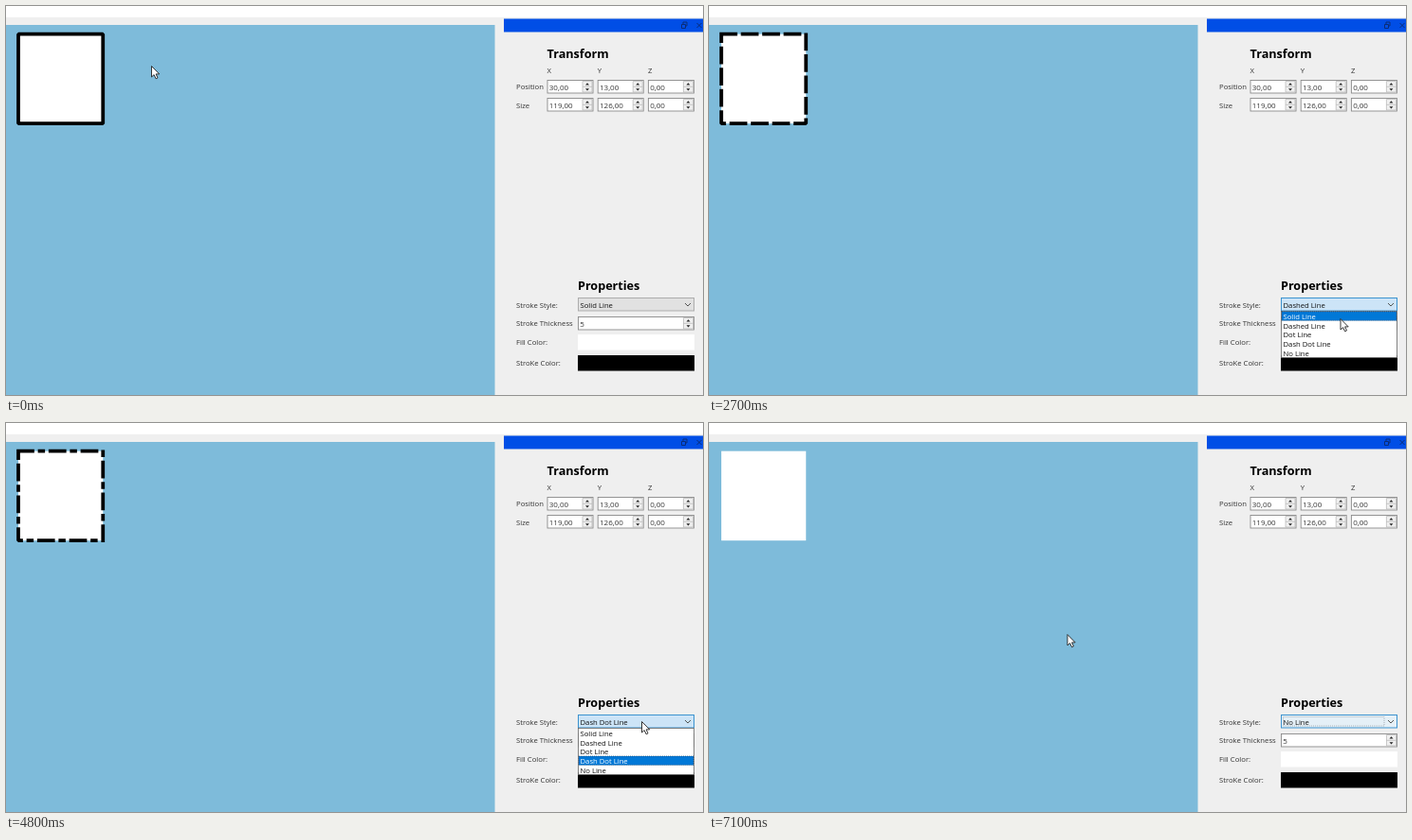
Recreate the animation shown at these times as an HTML page. Size 735 by 411 pixels, loop 7200 ms.

```html
<!DOCTYPE html>
<html lang="en">
<head>
<meta charset="utf-8">
<title>Stroke style panel</title>
<style>
  html, body { margin: 0; width: 100%; height: 100%; overflow: hidden; background: #efefef; }
  svg { display: block; width: 735px; height: 411px; }
  text { font: 7.7px "Open Sans", "Noto Sans", sans-serif; fill: #333; white-space: pre; }
  .heading { font-size: 12.6px; font-weight: 700; fill: #000; }
  .number { font-size: 8px; }
  .item { fill: #111; }
</style>
</head>
<body>
<svg id="stage" viewBox="0 0 735 411">
  <rect width="735" height="411" fill="#efefef"/>
  <rect width="735" height="12" fill="#fff"/>
  <rect y="20" width="515.5" height="391" fill="#7ebbda"/>
  <rect x="525" y="13.5" width="210" height="14" fill="#004ee6"/>
  <path d="M712.5 19.5h4v4h-4zM714 19v-2h4v4h-1.5M728.5 18l5 5m0-5l-5 5" fill="none" stroke="#0a2c78"/>
  <rect id="shape" x="13" y="29.7" width="89.25" height="94.5" fill="#fff" stroke="#000" stroke-width="3.75"/>
  <g id="panel"></g>
  <rect x="603" y="347" width="123" height="16.5" fill="#fff"/>
  <rect x="603" y="369" width="123" height="16.5"/>
  <g id="combo">
    <rect id="comboBox" x="603.5" y="308.5" width="122" height="13.5"/>
    <path id="focus" d="M605.5 310.5h106.5v9.5h-106.5z" fill="none" stroke="#8a949c" stroke-width=".7" stroke-dasharray="1 1"/>
    <path d="M716 314l3 3 3-3" fill="none" stroke="#444" stroke-width=".9"/>
    <text id="comboText" class="item" x="605.5" y="318.5"></text>
  </g>
  <g id="popup">
    <rect x="603.5" y="322.5" width="122" height="49" fill="#fff" stroke="#666" stroke-width=".8"/>
    <rect id="highlight" x="604" width="121" height="9.4" fill="#0078d7" stroke="#173f66" stroke-width=".7" stroke-dasharray="1 1"/>
  </g>
  <path id="cursor" d="M.5 .5v11.5l2.6-2.4 2 4.2 1.9-.9-1.9-4h3.6z" fill="#fff" stroke="#222" stroke-width=".9"/>
</svg>
<script>
const $ = id => document.getElementById(id);
const ROW = 9.7, LIST_TOP = 322.9, PEN = 3.75;
const styles = [
  { name: 'Solid Line', dash: [] },
  { name: 'Dashed Line', dash: [4, 2] },
  { name: 'Dot Line', dash: [1, 2] },
  { name: 'Dash Dot Line', dash: [4, 2, 1, 2] },
  { name: 'No Line' }
];

function add(parent, tag, attrs, content = '') {
  const el = document.createElementNS('http://www.w3.org/2000/svg', tag);
  for (const key in attrs) el.setAttribute(key, attrs[key]);
  el.textContent = content;
  return parent.appendChild(el);
}

const label = (x, y, content, cls = '') => add($('panel'), 'text', { x, y, class: cls }, content);

function spinBox(x, y, width, value) {
  const panel = $('panel'), right = x + width;
  add(panel, 'rect', { x: x + .5, y: y + .5, width: width - 1, height: 13.5, fill: '#fff', stroke: '#8a8a8a', 'stroke-width': .9 });
  add(panel, 'path', { d: `M${right - 11.5} ${y + 1.5}h10v11.5h-10zm0 5.8h10`, fill: '#f0f0f0', stroke: '#b5b5b5', 'stroke-width': .7 });
  add(panel, 'path', { d: `M${right - 8.5} ${y + 5.5}l2-2.2 2 2.2zm0 3.8l2 2.2 2-2.2z`, fill: '#222' });
  label(x + 2.3, y + 10.5, value, 'number');
}

label(570.5, 55.3, 'Transform', 'heading');
label(603, 300, 'Properties', 'heading');
['X', 'Y', 'Z'].forEach((axis, i) => {
  const x = 570.5 + 53.2 * i;
  label(x, 71, axis);
  spinBox(x, 78, 49, ['30,00', '13,00', '0,00'][i]);
  spinBox(x, 97, 49, ['119,00', '126,00', '0,00'][i]);
});
label(538, 88.3, 'Position');
label(538, 107.7, 'Size');
['Stroke Style:', 'Stroke Thickness', 'Fill Color:', 'StroKe Color:']
  .forEach((name, i) => label(538, [318.5, 338.3, 358.3, 380][i], name));
spinBox(603, 328, 123, '5');

const items = styles.map(({ name }, i) =>
  add($('popup'), 'text', { x: 605.5, y: 330.8 + ROW * i, class: 'item' }, name));

// [time, x, y] of the pointer tip
const path = [
  [0, 153, 63], [800, 660, 316], [1100, 660, 318], [1200, 661, 328], [1500, 663, 337],
  [1700, 663, 335], [2000, 664, 313], [2500, 664, 314], [2900, 667, 346], [3200, 667, 346],
  [3300, 667, 343], [3600, 669, 315], [3800, 669, 316], [4100, 670, 357], [4300, 670, 356],
  [4600, 670, 316], [4800, 670, 315], [5200, 668, 365], [5600, 668, 365], [5900, 635, 276],
  [6400, 402, 207], [6700, 377.5, 223], [7200, 377.5, 223]
];
// Popup open time, choice time; each choice picks the next style
const visits = [[900, 1700], [2500, 3200], [3800, 4300], [4700, 5400]];

function pointerAt(t) {
  const i = path.findIndex(p => p[0] > t);
  const [t0, x0, y0] = path[i - 1], [t1, x1, y1] = path[i];
  let k = (t - t0) / (t1 - t0);
  if (i === 1) k = k * k * (3 - 2 * k);
  return [x0 + (x1 - x0) * k, y0 + (y1 - y0) * k];
}

function draw(t) {
  const [x, y] = pointerAt(t);
  const current = visits.filter(v => t >= v[1]).length;
  const open = visits.some(([from, to]) => t >= from && t < to);
  const active = t >= 900 || (x > 603 && y > 308);
  const { name, dash } = styles[current];

  $('shape').setAttribute('stroke', dash ? '#000' : 'none');
  $('shape').setAttribute('stroke-dasharray', dash && dash.length ? dash.map(n => n * PEN).join(' ') : 'none');
  $('shape').setAttribute('stroke-linecap', 'square');
  $('shape').setAttribute('stroke-linejoin', 'bevel');

  $('comboText').textContent = name;
  $('comboBox').setAttribute('fill', open ? '#cce4f7' : active ? '#e5f0f7' : '#e1e1e1');
  $('comboBox').setAttribute('stroke', active ? '#3c93cf' : '#adadad');
  $('focus').style.display = !open && t >= 900 ? '' : 'none';

  $('popup').style.display = open ? '' : 'none';
  const hovered = y > LIST_TOP ? Math.min(4, Math.floor((y - LIST_TOP) / ROW)) : current;
  $('highlight').setAttribute('y', LIST_TOP + ROW * hovered);
  items.forEach((item, i) => item.style.fill = i === hovered ? '#fff' : '');

  $('cursor').setAttribute('transform', `translate(${x} ${y})`);
}

function tick() {
  draw(Math.floor(performance.now() % 7200 / 100) * 100);
  requestAnimationFrame(tick);
}
tick();
</script>
</body>
</html>
```
